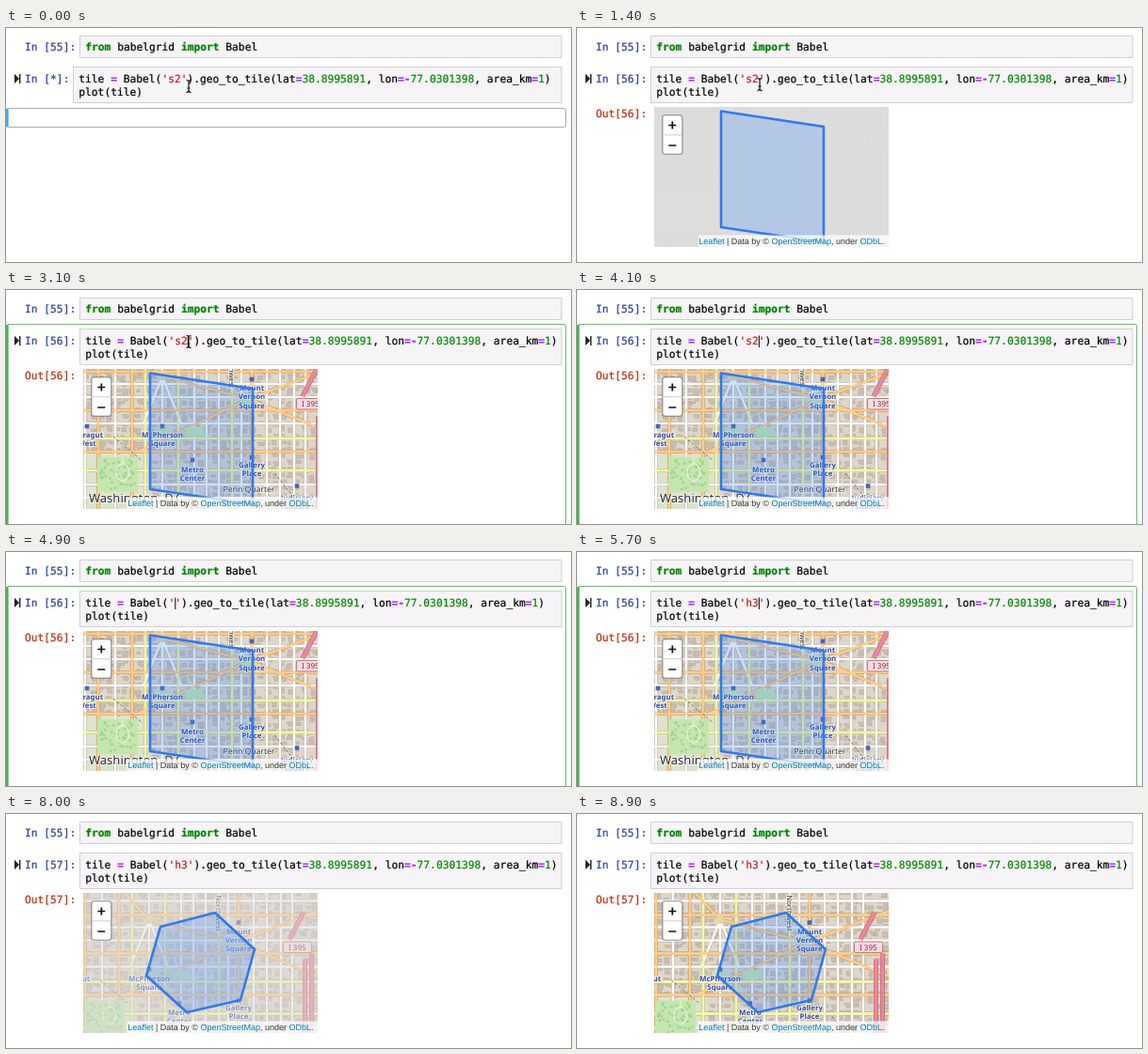
These frames come from a looping animation (600x249 px, 9000 ms). An HTML page:

```html
<!DOCTYPE html>
<html lang="en">
<head>
<meta charset="utf-8">
<title>Grid tiles in a notebook</title>
<style>
  html, body { margin: 0; width: 100%; height: 100%; overflow: hidden; background: #fff; }
  svg { display: block; }
  text { white-space: pre; text-rendering: geometricPrecision; }
  .mono { font: 11.25px "DejaVu Sans Mono", monospace; }
  .mono text, .mono tspan { fill: currentColor; stroke: currentColor; stroke-width: .22px; }
  .box { fill: #f6f4f6; stroke: #cfcfcf; }
  .in { color: #303f9f; }
  .out { color: #bf2f12; }
  .k { color: #008000; font-weight: bold; }
  .o { color: #a2f; font-weight: bold; }
  .n { color: #080; }
  .s { color: #ba2121; }
  .place { font: 8.6px "Noto Sans", sans-serif; fill: #2c2c2c; }
  .station { font: bold 7.9px "Noto Sans", sans-serif; fill: #354a9c; }
  .place, .station { text-anchor: middle; stroke: #fff; stroke-opacity: .7; stroke-width: 2px; paint-order: stroke; }
  .tile { fill: #38f; fill-opacity: .24; stroke: #3079ee; stroke-width: 2.6; stroke-linejoin: round; }
  .credit { font: 9px "Liberation Sans", Arial, sans-serif; fill: #333; text-anchor: end; }
  .link { fill: #0078a8; }
</style>
</head>
<body>
<svg width="600" height="249" viewBox="0 0 600 249">
  <defs><clipPath id="frame"><path d="M82 84H331V233H82Z"/></clipPath></defs>

  <g class="mono">
    <path class="box" d="M78.5 8.5H590V31.5H78.5Z"/>
    <text class="in" x="20" y="24">In [55]:</text>
    <text x="84.3" y="24"><tspan class="k">from</tspan> babelgrid <tspan class="k">import</tspan> Babel</text>

    <g id="edit" fill="none">
      <path d="M2 36.5H592.5Q594.5 36.5 594.5 38.5V249" stroke="#66bb6a"/>
      <path d="M0 37H2.6V249H0Z" fill="#4caf50"/>
    </g>
    <path d="M9 48.8V59L14 53.9Z" fill="#222"/>
    <path d="M14.7 49V59" stroke="#222" stroke-width="1.5"/>
    <text class="in" id="prompt" x="20" y="58"></text>
    <path class="box" id="cell"/>
    <g id="code">
      <text y="58">tile <tspan class="o">=</tspan> Babel(<tspan class="s" id="arg"></tspan>).geo_to_tile(lat<tspan class="o">=</tspan><tspan class="n">38.8995891</tspan>, lon<tspan class="o">=-</tspan><tspan class="n">77.0301398</tspan>, area_km<tspan class="o">=</tspan><tspan class="n">1</tspan>)</text>
      <text y="72">plot(tile)</text>
    </g>
    <path id="caret" d="M0 48.5V61" stroke="#000"/>
    <text class="out" id="label" x="20" y="95"></text>

    <g id="next">
      <rect x=".5" y="85.5" width="594" height="20" rx="2" fill="#fff" stroke="#ababab"/>
      <path d="M0 86H2.6V105H0Z" fill="#42a5f5"/>
    </g>
  </g>

  <g id="result" clip-path="url(#frame)">
    <path d="M82 84H331V233H82Z" fill="#ddd"/>
    <g id="tiles"></g>
    <path class="tile" id="square" d="M153 88.5L262 105V228L153 212Z"/>
    <path class="tile" id="hexagon" d="M164 120L222 105 264 144 249 198 192 211 149 172Z"/>
    <path d="M128.5 220.5H331V233H128.5Z" fill="#fff" fill-opacity=".75"/>
    <text class="credit" x="326.5" y="229.7"><tspan class="link">Leaflet</tspan> | Data by © <tspan class="link">OpenStreetMap</tspan>, under <tspan class="link">ODbL</tspan>.</text>
    <rect x="90.8" y="92.8" width="21" height="41.4" rx="3" fill="#fff" stroke="#000" stroke-opacity=".3" stroke-width="1.6"/>
    <path d="M91.5 113.8H111" stroke="#ccc"/>
    <path d="M97.3 103.5H105.3M101.3 99.5V107.5M97.3 125H105.3" stroke="#111" stroke-width="1.7"/>
  </g>

  <path id="arrow" d="M0 0V11.3L2.6 8.9 4.3 12.8 6.2 12 4.5 8.2H8Z" fill="#111" stroke="#fff" stroke-width=".8"/>
  <path id="beam" d="M-2.5 -6.5Q0 -6.5 0 -4.5Q0 -6.5 2.5 -6.5M0 -4.5V4.5M-2.5 6.5Q0 6.5 0 4.5Q0 6.5 2.5 6.5M-1.5 2H1.5" fill="none" stroke="#111" stroke-width="1.2"/>
</svg>

<script>
const LOOP = 9000;
const FIRST_MAP = 1400, CLICK = 2700, RUN = 6500, SECOND_MAP = 7900;
const $ = id => document.getElementById(id);
const show = (id, on) => $(id).style.display = on ? "" : "none";
const put = (id, text) => { if ($(id).textContent !== text) $(id).textContent = text; };
const clamp = v => Math.max(0, Math.min(1, v));
const ease = v => v * v * (3 - 2 * v);

function drawMap() {
  let seed = 11;
  const rnd = () => (seed = seed * 16807 % 2147483647) / 2147483647;
  const out = [];
  const area = (x, y, w, h, fill) =>
    out.push(`<rect x="${x}" y="${y}" width="${w}" height="${h}" fill="${fill}"/>`);
  const path = (d, color, width, dash = "none") =>
    out.push(`<path d="${d}" fill="none" stroke="${color}" stroke-width="${width}" stroke-dasharray="${dash}"/>`);

  area(80, 60, 270, 180, "#dfd6ca");
  area(82, 174, 70, 60, "#dde3cd");
  let blocks = "";
  for (let x = 82; x < 346; x += 8)
    for (let y = 62; y < 236; y += 7)
      if ((x > 150 || y < 172) && rnd() < .85)
        blocks += `M${x + rnd() * 2} ${y + rnd() * 2}h${3 + rnd() * 4}v${2 + rnd() * 4}h-${3 + rnd() * 3}z`;
  out.push(`<path d="${blocks}" fill="#cbbeb1" stroke="#b5a79b" stroke-width=".6"/>`);

  const vertical = xs => xs.map(x => `M${x} 60V240`).join("");
  const horizontal = ys => ys.map(y => `M80 ${y}H350`).join("");
  const minor = vertical([84, 116, 166, 200, 213, 226, 250, 277, 291, 306, 318]) +
    horizontal([72, 100, 114, 142, 207, 221, 235]) + "M166 92L146 142M166 92L186 142";
  const middle = vertical([148, 183, 240]) + horizontal([158, 192]);
  const major = vertical([98, 134, 261]) + horizontal([87, 128, 172]) +
    "M139 63L166 92 258 116 350 154M140 172L258 116 350 81";
  const roads = [[minor, "#fefefc", "#b9b0a4", 2.5], [middle, "#f3f5b0", "#a9b06c", 3], [major, "#f8cd92", "#c39355", 3]];
  roads.forEach(([d, , edge, w]) => path(d, edge, w + 1.1));
  roads.forEach(([d, fill, , w]) => path(d, fill, w));

  area(97, 178, 43, 37, "#c3e6ad");
  for (let i = 0; i < 45; i++)
    out.push(`<circle cx="${100 + rnd() * 37}" cy="${181 + rnd() * 31}" r="1.4" fill="#a5cf92"/>`);
  path("M117 194a7 9 0 1 0 14 0a7 9 0 1 0 -14 0M124 178V185", "#e8efd9", 1.4);
  area(157, 147, 18, 8, "#c3e6ad");
  area(190, 146, 20, 10, "#c3e6ad");
  area(249, 110, 13, 10, "#c3e6ad");
  out.push('<circle cx="166" cy="92" r="3.5" fill="#c3e6ad" stroke="#f8cd92" stroke-width="2"/>');
  path("M114 156L145 182M285 195L310 226", "#6d6660", .9, "3 2");

  const motorway = "M330 84L315 113M331.5 134V240M338.5 128V240";
  path(motorway, "#cf5f76", 5);
  path(motorway, "#e58b9c", 3.8);
  out.push('<rect x="308.5" y="115.5" width="30" height="11.5" rx="1.5" fill="#f5dddf" stroke="#cd7385"/>',
    '<text class="place" x="323.3" y="124.3" style="font-size:8px;fill:#7c2440;stroke:none">I 395</text>');

  const label = (cls, x, y, ...lines) => lines.forEach((line, i) =>
    out.push(`<text class="${cls}" x="${x}" y="${y + i * 9.4}">${line}</text>`));
  const stops = [[166, 145, 157, "McPherson", "Square"], [198, 181, 193.5, "Metro", "Center"],
    [261, 178, 188.5, "Gallery", "Place"], [261, 95, 107, "Mount", "Vernon", "Square"],
    [86, 145, 157, "Farragut", "West"], [309, 208.5, 224, "Judiciary", "Square"]];
  for (const [x, mark, y, ...lines] of stops) {
    area(x - 2.3, mark - 2.3, 4.6, 4.6, "#4b62b5");
    label("station", x, y, ...lines);
  }
  label("place", 258, 214.5, "Penn Quarter");
  out.push('<text class="place" transform="translate(237 85) rotate(90)" style="font-size:7.8px">Northwest</text>',
    '<text class="place" x="88" y="226" style="font-size:13px;text-anchor:start">Washington, D.C.</text>');
  $("tiles").innerHTML = out.join("");
}

function typed(t) {
  if (t < 4500) return "s2";
  if (t < 4800) return "s";
  if (t < 5100) return "";
  return t < 5400 ? "h" : "h3";
}

function mouse(t) {
  const up = ease(clamp((t - 1300) / 600)), down = ease(clamp((t - 2200) / 400));
  const y = 62 - 26 * up + 19 * down;
  const inCell = y > 42;
  show("beam", inCell && t < 3300);
  show("arrow", !inCell);
  $(inCell ? "beam" : "arrow").setAttribute("transform", `translate(${194 + up - down} ${y})`);
}

function draw(t) {
  const second = t >= RUN;
  const running = t < FIRST_MAP || (second && t < SECOND_MAP);
  const editing = t >= CLICK && !second;
  const count = second ? 57 : 56;
  const left = running ? 71.5 : 78.5;
  const word = typed(t);

  put("prompt", running ? "In [*]:" : `In [${count}]:`);
  put("label", `Out[${count}]:`);
  put("arg", `'${word}'`);
  $("cell").setAttribute("d", `M${left} 41.5H590V79.5H${left}Z`);
  $("code").setAttribute("transform", `translate(${left + 5.8})`);
  show("next", running);
  show("edit", editing);

  const lastKey = [5400, 5100, 4800, 4500, 4000, CLICK].find(k => t >= k);
  show("caret", editing && (t - lastKey) % 1060 < 530);
  $("caret").setAttribute("transform", `translate(${84.3 + (14 + word.length) * 6.773 + .7})`);

  show("label", !running);
  show("result", !running);
  show("square", !second);
  show("hexagon", second);
  $("tiles").setAttribute("transform", second ? "translate(-14 20.5)" : "");
  $("tiles").setAttribute("opacity", clamp((t - (second ? SECOND_MAP : FIRST_MAP)) / 200));
  mouse(t);
}

drawMap();
const start = performance.now();
function tick() {
  draw((performance.now() - start) % LOOP);
  requestAnimationFrame(tick);
}
tick();
</script>
</body>
</html>
```
